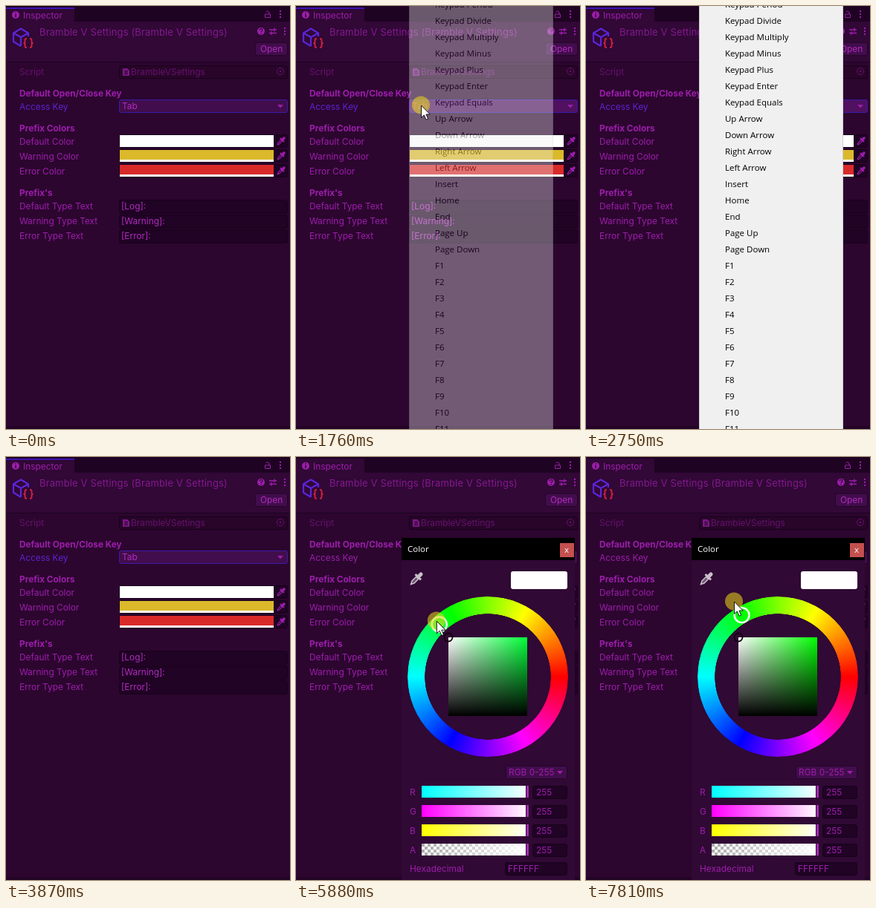
Write an HTML page that moves like this. It is 382x570 px and loops after 8000 ms.

```html
<!DOCTYPE html>
<html lang="en">
<head>
<meta charset="utf-8">
<title>Inspector settings</title>
<style>
html, body { margin: 0; width: 100%; height: 100%; overflow: hidden; background: #2c062f; }
#stage { position: relative; width: 382px; height: 570px; overflow: hidden; background: #2c062f;
  font: 11.9px/20px Inter, sans-serif; color: #9d1dac; }
#stage div, #stage svg { position: absolute; box-sizing: border-box; white-space: pre; }
#stage svg { left: 0; top: 0; overflow: visible; }
.layer { left: 0; top: 0; width: 382px; height: 570px; }
.bold { font-weight: 700; font-size: 11.8px; }
.title { font-size: 13px; letter-spacing: .14px; color: #84188f; }
.dim { color: #66116e; }
.bright { color: #b02bbd; }
.field { background: #200325; border: 1px solid #18021c; border-radius: 3px; }
.button { background: #420d4c; border: 1px solid #25052a; border-radius: 3px; }
.system { font: 11.5px/20px "Open Sans", sans-serif; }
.white { color: #fff; }
.ring { border-radius: 50%;
  background: conic-gradient(from 90deg, red, magenta, blue, cyan, lime, yellow, red);
  -webkit-mask: radial-gradient(circle, transparent 84.5px, #000 85px);
  mask: radial-gradient(circle, transparent 84.5px, #000 85px); }
#popup { color: #000; }
</style>
</head>
<body>
<div id="stage">
  <div id="inspector" class="layer"></div>
  <svg width="382" height="570" fill="none" stroke="#9d1dac">
    <defs>
      <g id="dropper" fill="currentColor" stroke="currentColor">
        <path d="M-5 5L-4 2L.5 -2.500L2.500 -.5L-2 4Z" fill-opacity=".4"/>
        <path d="M-1 -4L4 1" stroke-width="2"/>
        <path d="M1.500 -1.500L4 -4" stroke-width="3.400" stroke-linecap="round"/>
      </g>
    </defs>
    <g stroke="none" fill="#9d1dac">
      <circle cx="13" cy="12" r="5"/>
      <circle cx="343" cy="34" r="5"/>
      <path d="M365 133h8l-4 4.500z"/>
      <circle cx="369" cy="7" r="1.200"/><circle cx="369" cy="11" r="1.200"/><circle cx="369" cy="15" r="1.200"/>
      <circle cx="375" cy="30" r="1.200"/><circle cx="375" cy="34" r="1.200"/><circle cx="375" cy="38" r="1.200"/>
      <path d="M157 84h6l3 3v7h-9z" fill="#7c1687"/>
    </g>
    <path d="M13 11v4M13 8.500v1.300" stroke="#2c062f" stroke-width="1.600"/>
    <path d="M341.300 32.500q0-2 1.800-2t1.800 1.700q0 1.200-1.800 2.200v.6M343.100 36v1.400" stroke="#2c062f" stroke-width="1.200"/>
    <path d="M348.500 11h7v4.500h-7zM354 11v-2q-.3-2-2.200-2t-2 1.500"/>
    <path d="M354 32h10M354 36.500h10M361 29.500v5M357 34v5" stroke-width="1.300"/>
    <path d="M159 88h5M159 91h5M160.500 86.500v6M162.500 86.500v6" stroke="#2c062f" stroke-width=".8"/>
    <g stroke="#66116e"><circle cx="369" cy="88" r="4.500"/><circle cx="369" cy="88" r="1" fill="#66116e"/></g>
    <path d="M30 41V36.500L20 30.500L10 36.500V48L20 54M10 36.500L20 42L30 36.500M20 42V54" stroke="#5a25d8" stroke-width="2.200" stroke-linejoin="round"/>
    <path d="M28 44q-2.500 0-2.500 2v2.500q0 1.500-2 1.500q2 0 2 1.500V54q0 2 2.500 2M32 44q2.500 0 2.500 2v2.500q0 1.500 2 1.500q-2 0-2 1.500V54q0 2-2.500 2" stroke="#d3203c" stroke-width="1.900"/>
    <g color="#9d1dac"><use href="#dropper" x="370" y="182"/><use href="#dropper" x="370" y="202"/><use href="#dropper" x="370" y="222"/></g>
  </svg>
  <div id="picker" class="layer"></div>
  <div id="popup" class="layer"></div>
  <svg width="382" height="570">
    <g id="cursor">
      <circle id="press" cy="-.6" r="12" fill="#e8d418" fill-opacity=".57"/>
      <path d="M.5 0V16.500L4.300 13L7.100 19.300L9.700 18.200L7 12H12.300Z" fill="#fff" stroke="#000" stroke-width=".9"/>
    </g>
  </svg>
</div>
<script>
const $ = id => document.getElementById(id);
const inspector = $('inspector'), picker = $('picker'), popup = $('popup');

function add(parent, css, cls = '', text = '') {
  const el = document.createElement('div');
  el.style.cssText = css;
  el.className = cls;
  el.textContent = text;
  parent.append(el);
  return el;
}
const box = (parent, x, y, w, h, fill = '', cls = '') =>
  add(parent, `left:${x}px;top:${y}px;width:${w}px;height:${h}px;${fill && 'background:' + fill}`, cls);
const label = (parent, x, y, text, cls) => add(parent, `left:${x}px;top:${y - 10}px`, cls, text);

// Inspector
box(inspector, 0, 0, 382, 21, '#1f0322');
box(inspector, 0, 2, 92, 19, '#310836');
const tabLine = box(inspector, 0, 2, 92, 2, '#3b16b4');
box(inspector, 0, 21, 382, 55, '#310836');
box(inspector, 0, 75, 382, 1, '#1c021f');
box(inspector, 0, 566, 382, 4, '#220425');
label(inspector, 23, 13, 'Inspector');
label(inspector, 45, 35, 'Bramble V Settings (Bramble V Settings)', 'title');
box(inspector, 335, 49, 44, 18, '', 'button');
label(inspector, 342, 58, 'Open', 'bright');

label(inspector, 18, 89, 'Script', 'dim');
box(inspector, 152, 80, 227, 18, '#280529', 'field');
label(inspector, 168, 89, 'BrambleVSettings', 'dim');

label(inspector, 18, 118, 'Default Open/Close Key', 'bold');
const keyLabel = label(inspector, 18, 136, 'Access Key');
const dropdown = box(inspector, 152, 126, 227, 18, '', 'button');
label(inspector, 156, 135, 'Tab', 'bright');

label(inspector, 18, 165, 'Prefix Colors', 'bold');
[['Default', '#fff'], ['Warning', '#dbb92b'], ['Error', '#d92a2a']].forEach(([name, color], i) => {
  const y = 183 + 20 * i;
  label(inspector, 18, y, name + ' Color');
  box(inspector, 152, y - 10, 227, 18, '', 'field');
  box(inspector, 153, y - 9, 207, 16, '#fff');
  box(inspector, 153, y - 9, 207, 13, color);
});

label(inspector, 18, 252, "Prefix's", 'bold');
[['Default', 'Log'], ['Warning', 'Warning'], ['Error', 'Error']].forEach(([name, tag], i) => {
  const y = 270 + 20 * i;
  label(inspector, 18, y, name + ' Type Text');
  box(inspector, 152, y - 9, 227, 19, '', 'field');
  label(inspector, 155, y, `[${tag}]:`, 'bright');
});

// Color picker
box(picker, 142, 109, 233, 461, '#300934');
box(picker, 142, 109, 233, 30, '#000');
label(picker, 150, 124, 'Color', 'system white');
box(picker, 355, 116, 19, 19, '#c4504f');
label(picker, 361, 125, 'x', 'system white');
box(picker, 289, 154, 76, 24, '#fff').style.borderRadius = '3px';
box(picker, 150, 188, 216, 216, '', 'ring');
const square = box(picker, 205, 243, 106, 106);
box(picker, 282, 416, 83, 18, '', 'button');
label(picker, 286, 425, 'RGB 0-255');
const checker = 'repeating-conic-gradient(#aaa 0 25%, #fff 0 50%) 4px 0 / 8px 8px';
['cyan', 'magenta', 'yellow', ''].forEach((color, i) => {
  const y = 443 + 26 * i;
  label(picker, 153, y + 9, 'RGBA'[i]);
  box(picker, 169, y, 145, 16, `linear-gradient(90deg, ${color || '#fff0'}, #fff)` + (color ? '' : ', ' + checker));
  box(picker, 309, y, 5, 16, '#a02bb0').style.border = 'solid #300934';
  picker.lastChild.style.borderWidth = '0 1px';
  box(picker, 318, y, 47, 18, '', 'field');
  label(picker, 323, y + 9, '255');
});
label(picker, 153, 555, 'Hexadecimal');
box(picker, 281, 546, 84, 18, '', 'field');
label(picker, 285, 555, 'FFFFFF');
picker.insertAdjacentHTML('beforeend', `<svg width="382" height="570" fill="none">
  <use href="#dropper" transform="translate(162 164) scale(1.5)" color="#c9bfca"/>
  <path d="M351 423h8l-4 4.500z" fill="#9d1dac"/>
  <circle cx="205" cy="243" r="5.500" stroke="#14010f" stroke-width="1.800"/>
  <circle id="thumb" r="10" stroke="#fff" stroke-width="2.400"/></svg>`);
const thumb = $('thumb');

// Key list
const keypad = ['Period', 'Divide', 'Multiply', 'Minus', 'Plus', 'Enter', 'Equals'].map(k => 'Keypad ' + k);
const arrows = ['Up', 'Down', 'Right', 'Left'].map(k => k + ' Arrow');
const functionKeys = Array.from({ length: 11 }, (_, i) => 'F' + (i + 1));
const keys = [...keypad, ...arrows, 'Insert', 'Home', 'End', 'Page Up', 'Page Down', ...functionKeys];
box(popup, 152, 0, 194, 570, '#f0f0f0').style.cssText += 'border:solid #cfcfcf;border-width:0 1px';
const highlight = box(popup, 155, 0, 188, 22, '#90c8f6');
keys.forEach((key, i) => label(popup, 187, 22 * i - 2, key, 'system'));

// Cursor path: time, x, y
const path = [
  [0, 250, 572], [230, 250, 572], [600, 215, 330], [1000, 160, 136], [1050, 160, 136],
  [1250, 149, 136], [1510, 168, 134], [1780, 168, 134], [2160, 204, 289], [2470, 207, 164],
  [2520, 207, 164], [2750, 200, -22], [3869, 200, -22], [4300, 180, 189], [4759, 180, 189],
  [4760, 180, 181], [4860, 180, 181], [5550, 206, 216], [5630, 207, 217], [5830, 207, 217],
  [5910, 181, 223], [6060, 181, 223], [6570, 155, 329], [6650, 157, 339], [6800, 157, 339],
  [7100, 157, 290], [7580, 192, 204], [7810, 199, 195], [8000, 199, 195]
];
const still = (a, b) => !a || !b || (a[1] === b[1] && a[2] === b[2]);

function slope(i, axis) {
  const [a, b, c] = [path[i - 1], path[i], path[i + 1]];
  return still(a, b) || still(b, c) ? 0 : (c[axis] - a[axis]) / (c[0] - a[0]);
}

function cursorAt(t) {
  const i = path.findIndex((p, n) => t < path[n + 1][0]);
  const a = path[i], b = path[i + 1], span = b[0] - a[0], u = (t - a[0]) / span;
  const ease = u * u * (3 - 2 * u);
  return [1, 2].map(k => a[k] + (b[k] - a[k]) * ease
    + span * u * (1 - u) * (slope(i, k) * (1 - u) - slope(i + 1, k) * u));
}

const within = (t, from, to) => t >= from && t < to;
const show = (el, on) => el.style.visibility = on ? 'visible' : 'hidden';

function frame() {
  const t = performance.now() % 8000;
  const [x, y] = cursorAt(t);
  $('cursor').setAttribute('transform', `translate(${x.toFixed(1)} ${y.toFixed(1)})`);
  show($('press'), within(t, 1710, 1850) || within(t, 4530, 4860) || t >= 5830);

  const listOpen = within(t, 1710, 3560);
  show(popup, listOpen);
  popup.style.opacity = Math.min(1, (t - 1690) / 200);
  highlight.style.top = Math.floor((y + 13) / 22) * 22 - 13 + 'px';
  show(highlight, listOpen && t > 1800 && y > 0);

  const picking = t >= 4760;
  const hover = listOpen || (x > 152 && within(y, 126, 144));
  show(tabLine, !picking);
  keyLabel.style.color = picking ? '' : '#5f22cf';
  dropdown.style.borderColor = picking ? '' : '#3a1ba8';
  dropdown.style.background = hover ? '#4f1160' : '';

  show(picker, picking);
  const angle = t < 5830 ? 0 : Math.atan2(296 - y, x - 258);
  thumb.setAttribute('cx', 258 + 96 * Math.cos(angle));
  thumb.setAttribute('cy', 296 - 96 * Math.sin(angle));
  const hue = (angle * 180 / Math.PI + 360) % 360;
  square.style.background =
    `linear-gradient(#0000, #000), linear-gradient(90deg, #fff, hsl(${hue}, 100%, 50%))`;
  requestAnimationFrame(frame);
}
frame();
</script>
</body>
</html>
```
